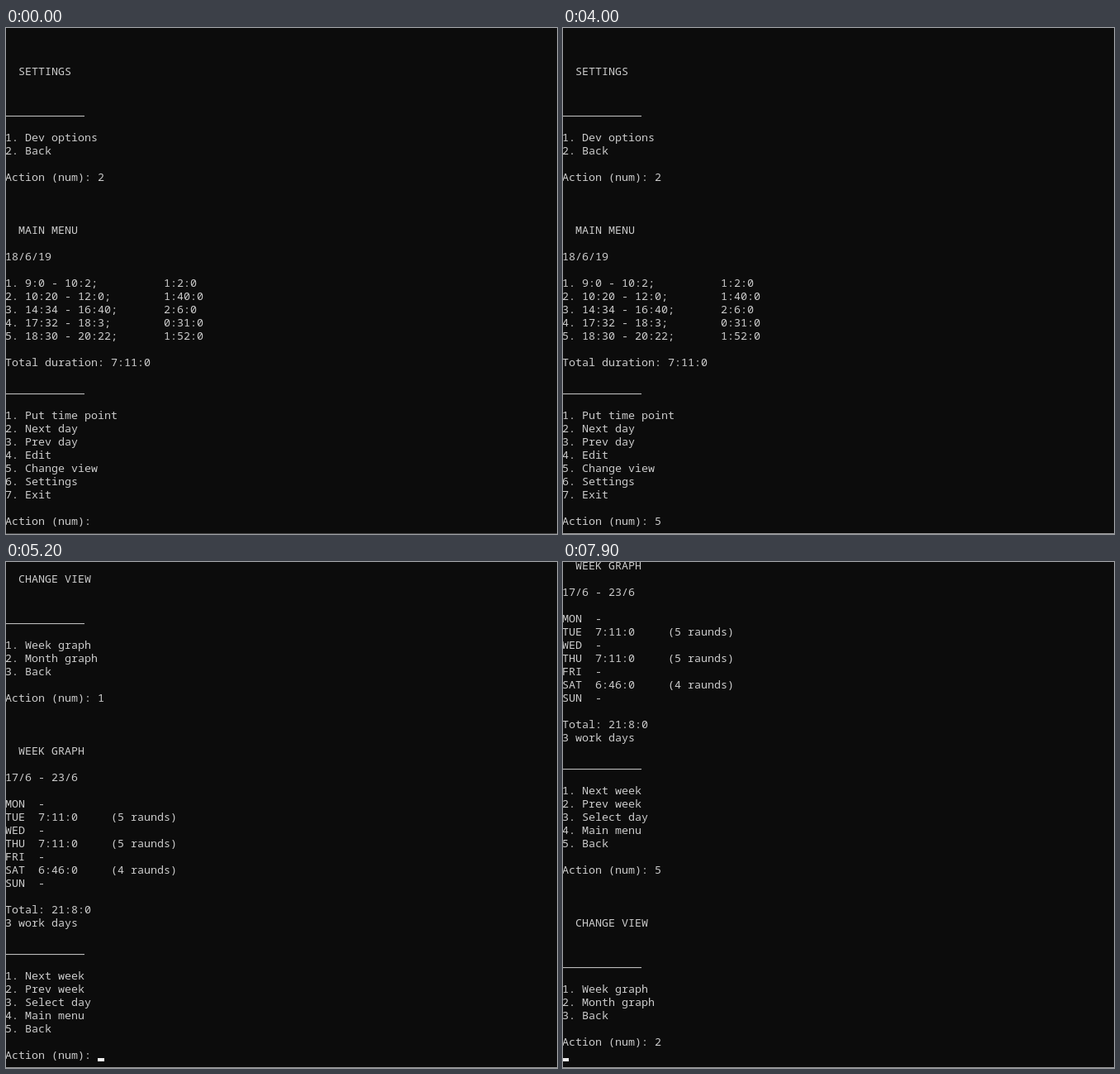
An HTML page for the animation above (8000 ms loop, 667 by 612 pixels).

```html
<!DOCTYPE html>
<html lang="en">
<head>
<meta charset="utf-8">
<title>Time tracker console</title>
<style>
  html, body {
    margin: 0;
    width: 100%;
    height: 100%;
    overflow: hidden;
    background: #0c0c0c;
  }

  .console {
    position: relative;
    width: 667px;
    height: 612px;
    overflow: hidden;
    background: #0c0c0c;
  }

  /* 8 x 16 px character cells */
  .buffer {
    position: absolute;
    left: -1px;
    top: -4px;
    margin: 0;
    color: #ccc;
    font: calc(40px / 3) / 16px "Noto Sans Mono", "DejaVu Sans Mono", monospace;
    font-variant-ligatures: none;
    white-space: pre;
  }

  .buffer, .key, .cursor, .edge {
    animation: 8s step-end infinite;
  }

  .buffer { animation-name: scroll; }

  .key { visibility: hidden; }
  .slip { position: absolute; animation-name: slip; }
  .view { animation-name: view; }
  .week { animation-name: week; }
  .back { animation-name: back; }
  .month { animation-name: month; }

  .cursor {
    position: absolute;
    left: -1px;
    top: 600px;
    width: 8px;
    height: 4px;
    background: #f2f2f2;
    animation-name: move, blink;
  }

  .edge {
    position: absolute;
    left: 0;
    top: 611px;
    width: 100%;
    height: 1px;
    animation-name: edge;
  }

  @keyframes scroll {
    0% { transform: translateY(0); }
    52.5% { transform: translateY(-208px); }
    65% { transform: translateY(-640px); }
    91.25% { transform: translateY(-848px); }
    98.75%, 100% { transform: translateY(-864px); }
  }

  @keyframes slip {
    40% { visibility: visible; }
    43.75% { visibility: hidden; }
  }
  @keyframes view { 45%, 100% { visibility: visible; } }
  @keyframes week { 62.5%, 100% { visibility: visible; } }
  @keyframes back { 88.75%, 100% { visibility: visible; } }
  @keyframes month { 97.5%, 100% { visibility: visible; } }

  @keyframes move {
    0%, 43.75%, 52.5%, 65%, 91.25% { transform: translateX(112px); }
    40%, 45%, 62.5%, 88.75%, 97.5% { transform: translateX(120px); }
    98.75%, 100% { transform: translateX(0); }
  }

  @keyframes blink {
    0%, 20%, 32.5%, 50%, 75%, 86.25% { opacity: 0; }
    13.75%, 26.25%, 38.75%, 52.5%, 80%, 88.75%, 100% { opacity: 1; }
  }

  @keyframes edge {
    0% { background: #484848; }
    7.5%, 100% { background: #9a9a9a; }
  }
</style>
</head>
<body>
<div class="console">
<pre class="buffer">



  SETTINGS


____________

1. Dev options
2. Back

Action (num): 2



  MAIN MENU

18/6/19

1. 9:0 - 10:2;          1:2:0
2. 10:20 - 12:0;        1:40:0
3. 14:34 - 16:40;       2:6:0
4. 17:32 - 18:3;        0:31:0
5. 18:30 - 20:22;       1:52:0

Total duration: 7:11:0

____________

1. Put time point
2. Next day
3. Prev day
4. Edit
5. Change view
6. Settings
7. Exit

Action (num): <span class="key slip">4</span><span class="key view">5</span>



  CHANGE VIEW


____________

1. Week graph
2. Month graph
3. Back

Action (num): <span class="key week">1</span>



  WEEK GRAPH

17/6 - 23/6

MON  -
TUE  7:11:0     (5 raunds)
WED  -
THU  7:11:0     (5 raunds)
FRI  -
SAT  6:46:0     (4 raunds)
SUN  -

Total: 21:8:0
3 work days

____________

1. Next week
2. Prev week
3. Select day
4. Main menu
5. Back

Action (num): <span class="key back">5</span>



  CHANGE VIEW


____________

1. Week graph
2. Month graph
3. Back

Action (num): <span class="key month">2</span>
</pre>
<div class="cursor"></div>
<div class="edge"></div>
</div>
</body>
</html>
```
